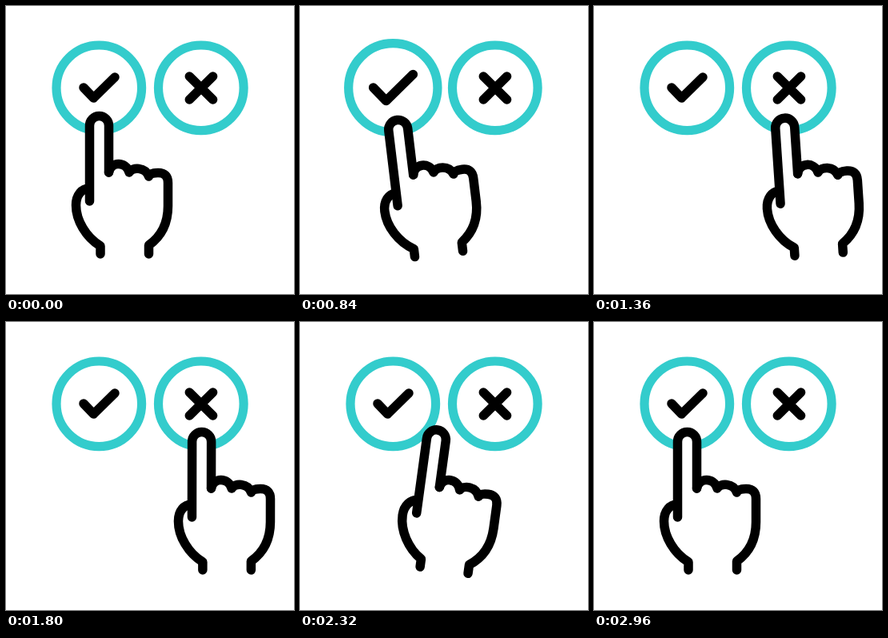
Recreate the animation shown at these times as an HTML page. Size 360 px wide and 360 px high, loop 3000 ms.

```html
<!DOCTYPE html>
<html>
<head>
<meta charset="utf-8">
<style>
  html, body { margin: 0; width: 100%; height: 100%; overflow: hidden; background: #fff }
  svg { display: block }
  path, circle {
    fill: none; stroke: #000; stroke-width: 11.5;
    stroke-linecap: round; stroke-linejoin: round;
    vector-effect: non-scaling-stroke;
  }
  circle { stroke: #3cc; stroke-width: 11.2 }
  .finger { fill: #fff }
</style>
</head>
<body>
<svg width="360" height="360" viewBox="0 0 360 360">
  <circle id="ring" cx="116.3" cy="102.3" r="53.3"/>
  <circle cx="243.8" cy="102.3" r="53.3"/>
  <path id="check" d="M97 102L109.5 115L136 89"/>
  <path d="M229.3 88L258.6 117M258.6 88L229.3 117"/>
  <g id="hand">
    <path d="M118 310V300C100 289 87.5 268 87.5 249C87.5 236 95 228 104 228"/>
    <path class="finger" d="M104.5 244V149.5a12 12 0 0 1 24 0V208"/>
    <path d="M128.5 208C131 194 150 194 154 208C158 201 174 201 178.5 213
      C180 209 186 208.5 190 208.5Q202.5 208.5 202.5 221V250C202.5 272 194 288 178.5 299V310"/>
  </g>
</svg>
<script>
const LOOP = 3000;
const $ = id => document.getElementById(id);

// Smooth 0 to 1 between times a and b.
const ease = (t, a, b) => {
  const u = Math.min(1, Math.max(0, (t - a) / (b - a)));
  return u * u * (3 - 2 * u);
};
// Rises over a..b, holds, falls over c..d.
const pulse = (t, a, b, c, d) => ease(t, a, b) - ease(t, c, d);
const scaleAt = (x, y, s) => `translate(${x} ${y}) scale(${s}) translate(${-x} ${-y})`;

function draw(t) {
  const grow = pulse(t, 60, 400, 600, 1000);
  $('ring').setAttribute('r', 53.3 + 6.7 * grow);
  $('check').setAttribute('transform', scaleAt(116.5, 102, 1 + 0.79 * grow));

  const press = 1 - 0.137 * pulse(t, 40, 400, 420, 820);
  const x = 128 * pulse(t, 693, 1400, 1885, 2605);
  const tilt = 7.8 * pulse(t, 1780, 2100, 2330, 2960) - 6.9 * pulse(t, 600, 840, 1120, 1640);
  $('hand').setAttribute('transform',
    `translate(${x} ${Math.abs(tilt) / 9}) rotate(${tilt} 147 220) ${scaleAt(115, 152, press)}`);
}

function tick() {
  draw(performance.now() % LOOP);
  requestAnimationFrame(tick);
}
tick();
</script>
</body>
</html>
```
